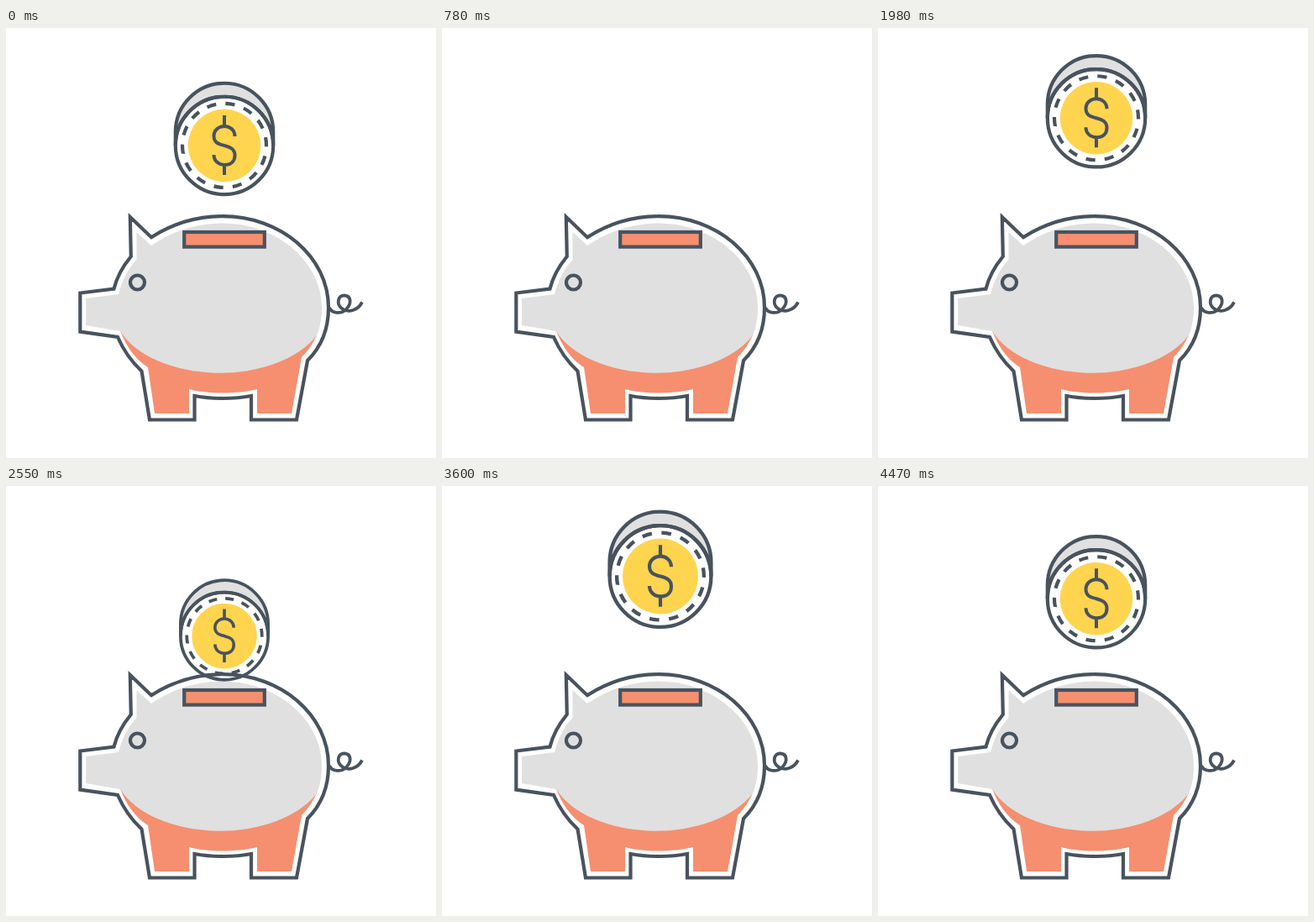
Animation, 512 px wide and 512 px high, one loop 4500 ms. Source, as an HTML page:

```html
<!DOCTYPE html>
<html lang="en">
<head>
<meta charset="utf-8">
<title>Piggy bank</title>
<style>
  html, body { margin: 0; height: 100%; overflow: hidden; background: #fff; }
  svg { display: block; width: 100vw; height: 100vh; }
  .line { fill: none; stroke: #48535e; stroke-width: 4.2; stroke-miterlimit: 8; }
  .grey { fill: #e0e0e0; }
  .coral { fill: #f58f70; }
  .gold { fill: #ffd44f; }
</style>
</head>
<body>
<svg viewBox="0 0 512 512">
  <clipPath id="aboveSlot"><rect width="512" height="258"/></clipPath>

  <g id="pig">
    <path class="coral" d="M136 361C143 378 153 394 169 404L177 459H218V430C240 436 275 436 299 430V459H340L352 392C361 383 366 374 370 366Z"/>
    <path class="grey" d="M95 322L134 317C138 301 145 287 155.500 276V243L173 259C200 241 228 232.500 258 232.500C322 232.500 376 278 376 333C376 345 374 357 370 366A127 77 0 0 1 136 361L95 354Z"/>
    <path class="line" d="M147.800 225L173 249.200C200 232 228 224.200 258 224.200C328 224.200 384 273 384 333C384 358 375 380 359 396L346 466.500H292V438C272 442 245 442 224.500 438V466.500H171L161.500 408.500C149 397 140 384 133 368L88.300 361.700V315.500L128.500 310.500C132 296 139 284 148.800 272Z"/>
    <circle class="line" cx="156.500" cy="303" r="8.500"/>
    <rect class="line" style="fill:#f58f70" x="212.200" y="243" width="95.600" height="17.600"/>
    <path id="tail" class="line" style="stroke-width:3.800" d="M385 333C388 340 399 341 405 335C412 328 411 319 403 318.500C395 318 393 329 400 334C408 340 419 336 424 326.500"/>
  </g>

  <g clip-path="url(#aboveSlot)">
    <g id="coin">
      <path class="line" style="fill:#e0e0e0" d="M-58.200 8V-8A58.200 58.200 0 0 1 58.200 -8V8A58.200 58.200 0 0 0 -58.200 8Z"/>
      <g transform="translate(0 8)">
        <circle class="line" r="58.200"/>
        <circle class="line" r="50" pathLength="28" stroke-dasharray="1 1" transform="rotate(-11.3)"/>
        <circle class="gold" r="43.300"/>
        <path class="line" style="stroke-width:4" d="M0 -36V-23M0 23V35M12.500 -11C12.500 -18 7 -23 0 -23S-12.500 -18 -12.500 -11.500C-12.500 -3 -6 -1.500 0 0S12.500 3.500 12.500 11.500S7 23 0 23S-12.500 18 -12.500 11"/>
      </g>
    </g>
  </g>
</svg>
<script>
  const LOOP = 4500, CYCLE = 2100;
  const [pig, tail, coin] = ['pig', 'tail', 'coin'].map(id => document.getElementById(id));

  // Eased progress from 0 to 1 between two times.
  const ease = (t, from, to) => {
    const u = Math.min(1, Math.max(0, (t - from) / (to - from)));
    return u * u * (3 - 2 * u);
  };

  // Two drops per loop; the first one rests for 300 ms before the next coin.
  const cycleTime = t => {
    if (t < 1080) return Math.min(t + 420, 1200);
    return (t + 120) % CYCLE;
  };

  function draw(now) {
    const t = cycleTime(now % LOOP);

    const popping = t > 1200;
    const drop = popping ? 0 : 32.5 * (t / 420) ** 2.6;
    const size = popping
      ? 1.11 * ease(t, 1185, 1530) - 0.11 * ease(t, 1530, 1680)
      : 1 - 0.23 * ease(t, 430, 730);
    coin.setAttribute('transform', `translate(260 ${99.25 + drop}) scale(${size})`);

    const squash = ease(t, 690, 860) - ease(t, 860, 1160);
    const spread = 0.028 * squash;
    pig.setAttribute('transform',
      `translate(260 467) scale(${1 + spread} ${1 - spread}) translate(-260 -467)`);
    tail.setAttribute('transform',
      `translate(385 333) rotate(${-5 * squash}) scale(${1 + 0.17 * squash}) translate(-385 -333)`);
  }

  const start = performance.now();
  const tick = () => {
    draw(performance.now() - start);
    requestAnimationFrame(tick);
  };
  tick();
</script>
</body>
</html>
```
